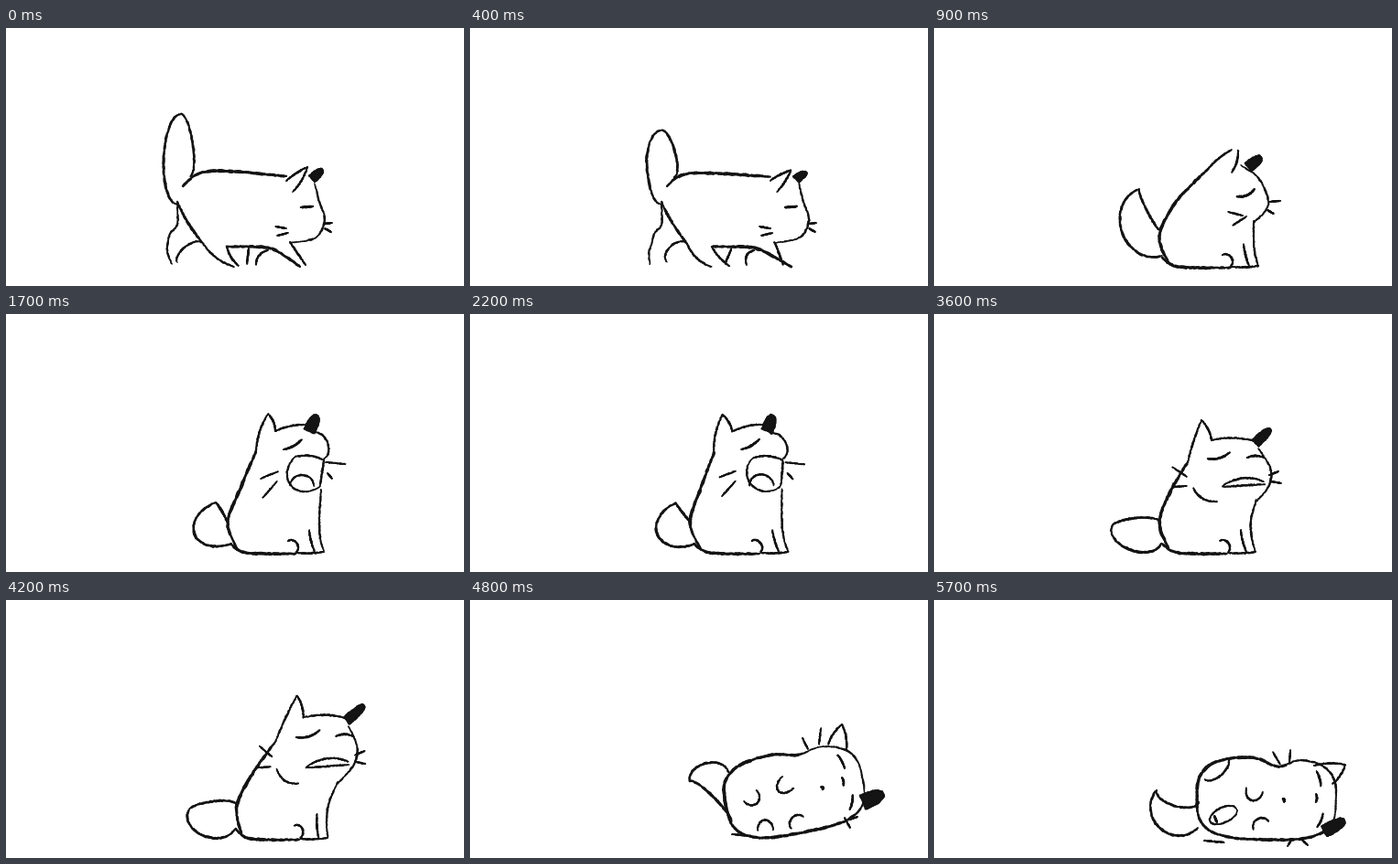
These frames come from a looping animation (500 by 282 pixels, 5800 ms). An HTML page with a canvas:

```html
<!DOCTYPE html>
<html lang="en">
<head>
<meta charset="utf-8">
<title>Sleepy cat</title>
<style>
html, body { margin: 0; width: 100%; height: 100%; overflow: hidden; background: #fff; }
canvas { display: block; width: 500px; height: 282px; }
</style>
</head>
<body>
<canvas id="stage" width="500" height="282"></canvas>
<script>
const ctx = document.getElementById('stage').getContext('2d');
const LOOP = 5800, STEP = 100, SAMPLES = 40, FLOOR = 262;
const INK = '#141414', FINE = 2.2;
const WEIGHT = { back: 3.4, belly: 3.2, tailA: 2.8, tailB: 2.6, rump: 2.8, eye: 2.5, w1: 1.9, w2: 1.9, w3: 1.9, w4: 1.9 };

const mix = (a, b, k) => [a[0] + (b[0] - a[0]) * k, a[1] + (b[1] - a[1]) * k];
const range = (n, fn) => Array.from({ length: n + 1 }, (_, i) => fn(i / n));

// Resamples a line evenly by length, so any two strokes can blend.
function even(pts) {
  const len = [0];
  for (let i = 1; i < pts.length; i++)
    len.push(len[i - 1] + Math.hypot(pts[i][0] - pts[i - 1][0], pts[i][1] - pts[i - 1][1]));
  let i = 1;
  return range(SAMPLES, u => {
    const want = u * len[len.length - 1];
    while (i < len.length - 1 && len[i] < want) i++;
    return mix(pts[i - 1], pts[i], Math.min(1, (want - len[i - 1]) / (len[i] - len[i - 1] || 1)));
  });
}

// A line pushed sideways by b at its middle; positive b is up when drawn to the right.
function bend(x0, y0, x1, y1, b, along, off) {
  const dx = x1 - x0, dy = y1 - y0, d = Math.hypot(dx, dy);
  return even(range(SAMPLES, u => {
    const s = along(u), h = b * off(u) / d;
    return [x0 + dx * s + dy * h, y0 + dy * s - dx * h];
  }));
}
const bow = (x0, y0, x1, y1, b = 0) => bend(x0, y0, x1, y1, b, u => u, u => 4 * u * (1 - u));
const loop = (x0, y0, x1, y1, b) =>
  bend(x0, y0, x1, y1, b, u => (1 - Math.cos(Math.PI * u)) / 2, u => Math.sin(Math.PI * u));

// Smooth curve through a few points.
function curve(...p) {
  const at = i => p[Math.max(0, Math.min(p.length - 1, i))];
  const out = [];
  for (let i = 0; i < p.length - 1; i++)
    out.push(...range(12, u => [0, 1].map(k => {
      const [a, b, c, d] = [-1, 0, 1, 2].map(j => at(i + j)[k]);
      return b + .5 * u * (c - a + u * (2 * a - 5 * b + 4 * c - d + u * (3 * (b - c) + d - a)));
    })));
  return even(out);
}

// Filled ear: wide base, blunt tip.
function leaf(x0, y0, x1, y1, w) {
  const d = Math.hypot(x1 - x0, y1 - y0);
  const nx = (y1 - y0) / d * w, ny = (x0 - x1) / d * w;
  const side = sign => range(10, s => {
    const h = sign * Math.sqrt(1 - .9 * s ** 3), [x, y] = mix([x0, y0], [x1, y1], s);
    return [x + nx * h, y + ny * h];
  });
  const edge = [...side(1), ...side(-1).reverse()];
  return even([...edge, edge[0]]);
}

const ear = (x0, y0, tx, ty, x1, y1, b = 3) => ({ earN: bow(x0, y0, tx, ty, b), earM: bow(tx, ty, x1, y1, 2) });
const tail = (x, y, xa, ya, a, xb, yb, b) => ({ tailA: loop(x, y, xa, ya, a), tailB: loop(x, y, xb, yb, b) });
const whiskers = (...ends) => Object.fromEntries(ends.map((e, i) => ['w' + (i + 1), bow(...e)]));

// Seated body: only the nape, the hip, the front foot and the top of the chest differ.
function seated(nape, hunch, hip, foot, chest, parts) {
  return {
    back: curve(nape, [(nape[0] + hip) / 2 - hunch, (nape[1] + 228) / 2], [hip, 228], [hip + 10, 256]),
    belly: curve([hip + 3, 251], [hip + 16, 260], [hip + 40, FLOOR], [foot - 31, FLOOR]),
    chest: curve(chest, [foot - 5, 225], [foot - 4, 245], [foot, 260]),
    shin: bow(foot - 16, 236, foot - 10, 260, -1),
    paw: loop(foot - 39, 248, foot - 30, 260, 6),
    toe: bow(foot - 30, 261, foot, 260, -1),
    ...parts
  };
}

// Rolled-over body: a rounded box with a dip at the neck.
function lying(cx, cy, tilt, dip, eyeX, parts) {
  const c = Math.cos(tilt), s = Math.sin(tilt);
  const place = (u, v) => [cx + u * c - v * s, cy + u * s + v * c];
  const power = x => Math.sign(x) * Math.abs(x) ** (2 / 3.2);
  const edge = (from, to) => even(range(90, k => {
    const a = from + (to - from) * k, u = 76 * power(Math.cos(a)), v = 45 * power(Math.sin(a));
    return place(u, v < 0 ? v + dip * Math.exp(-(((u - 12) / 16) ** 2)) : v);
  }));
  const tick = (u0, v0, u1, v1) => bow(...place(u0, v0), ...place(u1, v1), 1);
  return {
    back: edge(-1.45, -3.9), belly: edge(2.38, .6), head: edge(-1.45, .6),
    heel: bow(cx - 68, cy + 46, cx - 46, cy + 48),
    eye: tick(eyeX, 0, eyeX + 1, 3),
    fold1: tick(54, -31, 59, -15), fold2: tick(54, -6, 54, 3), fold3: tick(62, 15, 56, 30),
    ...parts
  };
}

const walk = {
  ...tail(191, 94, 187, 193, -17, 201, 162, 8),
  back: curve([306, 162], [250, 157], [213, 158], [193, 173]),
  rump: bow(187, 190, 214, 234, -2),
  leg1: curve([187, 193], [187, 215], [179, 225], [176, 243], [181, 258]),
  leg2: loop(214, 235, 187, 256, -8), leg3: bow(214, 234, 249, 261, -4),
  leg4: bow(241, 239, 254, 260, -2), leg5: bow(265, 241, 263, 258),
  leg6: bow(286, 243, 273, 259, -4), leg7: bow(310, 234, 327, 259),
  belly: curve([241, 239], [285, 240], [304, 249], [321, 261]),
  head: curve([337, 170], [342, 190], [348, 210], [338, 229], [310, 235]),
  ...ear(306, 167, 329, 152, 313, 179, 1), earD: leaf(334, 165, 345, 155, 4.5),
  eye: bow(322, 196, 335, 195),
  ...whiskers([294, 217, 306, 219], [296, 227, 308, 224], [347, 214, 356, 213], [348, 219, 355, 223])
};
const sit = seated([299, 154], 9, 246, 354, [349, 211], {
  ...tail(224, 176, 249, 249, -33, 246, 220, -3),
  head: curve([335, 150], [355, 165], [365, 193], [349, 213]),
  earN: bow(297, 157, 325, 133, 2), earM: bow(332, 134, 325, 158, 2), earD: leaf(343, 152, 357, 141, 5.5),
  eye: bow(331, 184, 350, 176, -3),
  ...whiskers([321, 201, 337, 205], [326, 216, 341, 206], [366, 190, 378, 189], [364, 199, 371, 203])
});
const howl = seated([273, 150], 1, 242, 347, [344, 192], {
  ...tail(229, 206, 246, 251, -34, 241, 227, 1),
  head: loop(334, 130, 347, 158, 11), crown: bow(294, 128, 327, 121, 2),
  ...ear(273, 152, 286, 109, 294, 128), earD: leaf(331, 128, 339, 111, 6),
  eye: bow(303, 148, 323, 137, -2),
  lip: bow(347, 160, 316, 156, -3), jaw: loop(316, 156, 343, 188, -24),
  tongue: loop(310, 188, 336, 188, 12), chin: bow(347, 160, 343, 187),
  ...whiskers([278, 180, 297, 172], [280, 201, 296, 183], [349, 162, 371, 164], [351, 174, 356, 180])
});
const yawn = seated([267, 168], 2, 241, 351, [346, 187], {
  ...tail(213, 215, 247, 253, -27, 241, 225, -8),
  head: loop(352, 142, 347, 163, 7), crown: bow(288, 137, 327, 124, 3),
  ...ear(267, 168, 265, 123, 288, 137), earD: leaf(335, 131, 336, 115, 6),
  eye: bow(297, 151, 320, 139, 1),
  lip: bow(347, 162, 299, 173, -7), jaw: loop(299, 173, 347, 187, -11),
  tongue: loop(302, 186, 332, 186, 13), chin: bow(348, 163, 347, 187, 2),
  ...whiskers([268, 167, 276, 171], [260, 187, 278, 181, -2], [354, 166, 371, 170], [352, 176, 365, 187])
});
const chew = seated([277, 162], 4, 246, 351, [352, 203], {
  ...tail(194, 233, 248, 251, -17, 246, 227, 7),
  head: curve([354, 147], [367, 168], [366, 187], [352, 205]), crown: bow(303, 138, 350, 139, 3),
  ...ear(277, 162, 292, 116, 303, 138, 1), earD: leaf(351, 141, 367, 126, 5),
  eye: bow(299, 158, 323, 151, -3), nose: bow(342, 157, 360, 157, 2),
  lip: bow(360, 183, 315, 188, -6), jaw: bow(315, 189, 361, 186), cheek: bow(283, 190, 309, 205, -5),
  ...whiskers([260, 167, 276, 178], [261, 189, 276, 188], [366, 176, 376, 172], [367, 183, 379, 185])
});
const flop = lying(354, 210, -.19, 6, 30, {
  ...tail(240, 198, 285, 243, 6, 282, 188, 15),
  ...ear(391, 158, 406, 136, 411, 164, 2), earD: leaf(429, 221, 451, 212, 8),
  pad1: loop(299, 220, 313, 208, -11), pad2: loop(341, 193, 353, 206, -14),
  pad3: loop(314, 252, 331, 251, 11), pad4: loop(351, 250, 364, 237, 8),
  ...whiskers([363, 151, 369, 163], [383, 140, 381, 158], [409, 238, 415, 249], [414, 240, 423, 237])
});
const sleep = lying(363, 217, .02, 10, 18, {
  ...tail(243, 208, 288, 249, -28, 289, 221, -11),
  ...ear(415, 181, 449, 180, 435, 201, 2), earD: leaf(426, 253, 448, 241, 6.5),
  pad0: loop(296, 196, 321, 174, -8),
  pad1: curve(...range(16, k => [316 + 15 * Math.cos(k * 6.28), 235 + 10 * Math.sin(k * 6.28 - .5)])),
  bean: bow(306, 236, 309, 243), pad2: loop(341, 205, 359, 210, -12), pad4: loop(349, 251, 365, 242, 8),
  ...whiskers([370, 166, 378, 180], [389, 164, 388, 179], [391, 261, 386, 269], [401, 261, 408, 268])
});

function warp(pose, move) {
  return Object.fromEntries(Object.entries(pose).map(([name, pts]) => [name, pts.map(p => move(p[0], p[1], name))]));
}
const lean = (pose, skew, tall = 1) => warp(pose, (x, y) => [x + (FLOOR - y) * skew, FLOOR - (FLOOR - y) * tall]);
const stride = (dx, swing, droop) => warp(walk, (x, y, name) => {
  const side = name.startsWith('leg') && name[3] % 2 ? 1 : -1;
  const low = Math.max(0, y - 236), high = Math.max(0, 165 - y);
  return [x + dx + low * swing * side - high * droop * .2, y + high * droop];
});

const keys = [
  [0, walk], [200, stride(10, .35, .06)], [400, stride(22, -.3, .25)],
  [600, warp(lean(sit, 0, 1.05), (x, y) => [x + 9, y])],
  [900, sit], [1200, lean(sit, -.02, .98)],
  [1500, lean(howl, .03, .97)], [1700, howl], [2100, lean(howl, -.06)],
  [2600, lean(yawn, 0, 1.03)], [2800, yawn], [3100, lean(yawn, -.02)],
  [3600, chew], [3800, lean(chew, .02)], [4250, lean(chew, .18, 1.08)],
  [4800, flop], [4950, flop], [5350, warp(sleep, (x, y) => [x + (x - 340) * .03, y - 2])], [5700, sleep]
];

function blend(a, b, k) {
  const out = {};
  for (const name of new Set([...Object.keys(a), ...Object.keys(b)])) {
    if (a[name] && b[name]) out[name] = a[name].map((p, i) => mix(p, b[name][i], k));
    else if (k < .5 ? a[name] : b[name]) out[name] = a[name] || b[name];
  }
  return out;
}

function poseAt(t) {
  let i = 0;
  while (i < keys.length - 2 && keys[i + 1][0] <= t) i++;
  const [t0, a] = keys[i], [t1, b] = keys[i + 1];
  const k = Math.min(1, (t - t0) / (t1 - t0));
  return blend(a, b, k * k * (3 - 2 * k));
}

function random(seed) {
  let s = seed * 7919 + 17;
  return () => (s = (s * 16807 + 11) % 2147483647) / 2147483647;
}

// Rough pen line: each short piece gets its own width.
function drawStroke(pts, weight, rnd) {
  const q = pts.map(p => [p[0] + (rnd() - .5) * .6, p[1] + (rnd() - .5) * .6]);
  for (let i = 1; i < q.length; i++) {
    const taper = .75 + .25 * Math.sin(Math.PI * i / q.length);
    ctx.lineWidth = weight * taper * (.75 + .5 * rnd());
    ctx.beginPath();
    ctx.moveTo(...q[i - 1]);
    ctx.lineTo(...q[i]);
    ctx.stroke();
  }
}

function draw(t) {
  const rnd = random(t / STEP + 1);
  ctx.fillStyle = '#fff';
  ctx.fillRect(0, 0, 500, 282);
  ctx.fillStyle = ctx.strokeStyle = INK;
  ctx.lineCap = ctx.lineJoin = 'round';
  for (const [name, pts] of Object.entries(poseAt(t))) {
    if (name === 'earD') {
      ctx.beginPath();
      pts.forEach(p => ctx.lineTo(...p));
      ctx.fill();
    }
    drawStroke(pts, WEIGHT[name] || FINE, rnd);
  }
}

const start = performance.now();
let shown = -1;
function tick() {
  const now = Math.max(0, performance.now() - start) % LOOP;
  const t = Math.floor(now / STEP) * STEP;
  if (t !== shown) draw(shown = t);
  requestAnimationFrame(tick);
}
tick();
</script>
</body>
</html>
```
